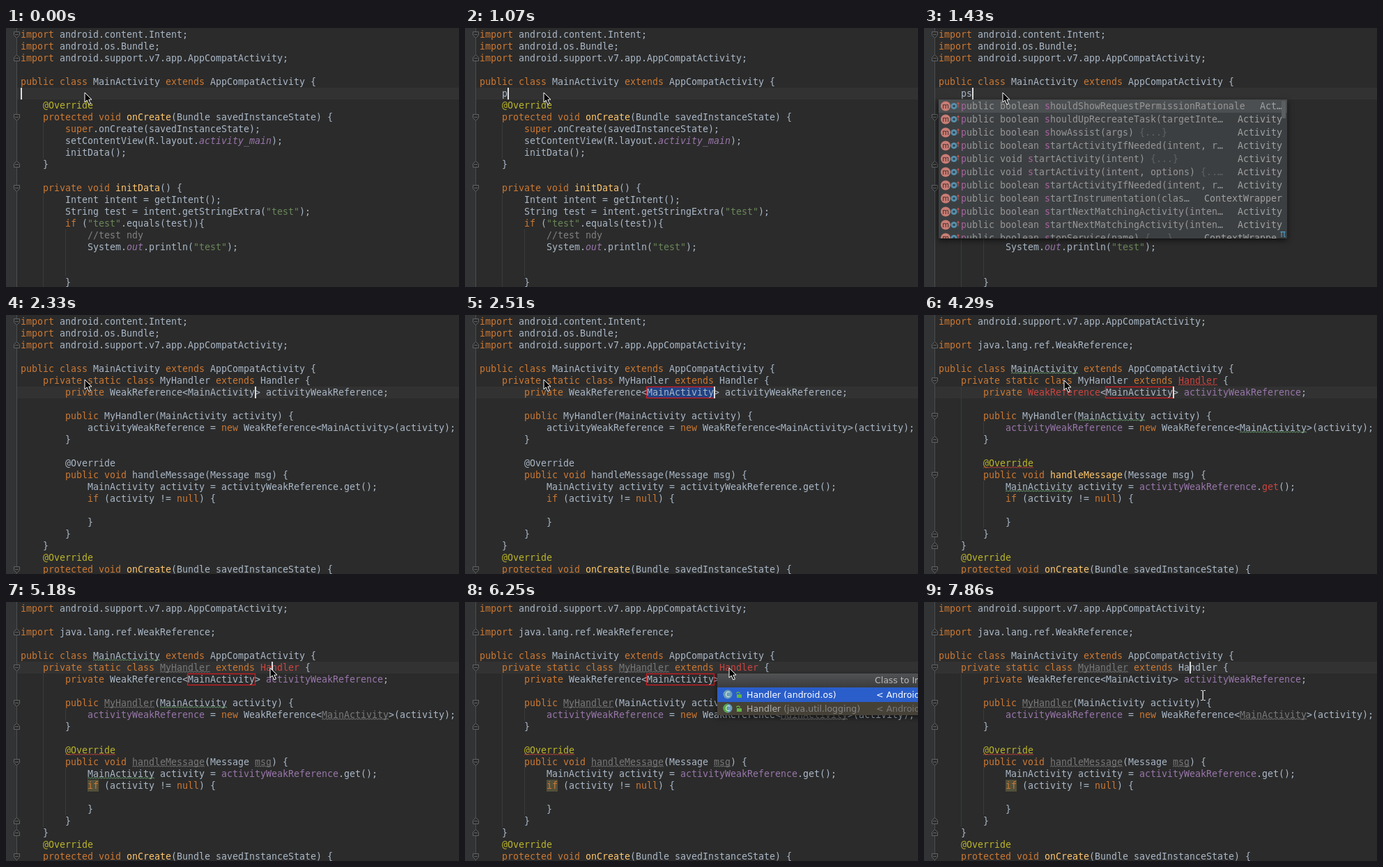
Recreate the animation shown at these times as an HTML page with a canvas. Size 650 by 373 pixels, loop 8000 ms.

```html
<!DOCTYPE html>
<html lang="en">
<head>
<meta charset="utf-8">
<title>Editor</title>
<style>
html, body { margin: 0; width: 100%; height: 100%; overflow: hidden; background: #2b2b2b; }
canvas { display: block; }
</style>
</head>
<body>
<canvas id="stage" width="650" height="373"></canvas>
<script>
(() => {
const ctx = document.getElementById('stage').getContext('2d');
const LOOP = 8000, LEFT = 21, CHAR = 8, LINE = 17;
const MONO = '13.29px "DejaVu Sans Mono", monospace';
const SANS = '12.5px "DejaVu Sans", sans-serif';
const SMALL = '10px "DejaVu Sans", sans-serif';
const C = {
  text: '#a9b7c6', key: '#cc7832', method: '#ffc66d', note: '#bbb529', string: '#6a8759',
  grey: '#808080', field: '#9876aa', error: '#cc4440', wave: '#659c6b', unused: '#787878'
};
const KEYWORDS = new Set('import public class extends protected void super private if new static null'.split(' '));

const oldImports = `import android.content.Intent;
import android.os.Bundle;
import android.support.v7.app.AppCompatActivity;
`.split('\n');
const newImports = [oldImports[2], '', 'import java.lang.ref.WeakReference;', ''];
const classLine = 'public class MainActivity extends AppCompatActivity {';
const plainBody = `    @Override
    protected void onCreate(Bundle savedInstanceState) {
        super.onCreate(savedInstanceState);
        setContentView(R.layout.activity_main);
        initData();
    }

    private void initData() {
        Intent intent = getIntent();
        String test = intent.getStringExtra("test");
        if ("test".equals(test)){
            //test ndy
            System.out.println("test");


        }`.split('\n');
const handlerBody = `    private static class MyHandler extends Handler {
        private WeakReference<MainActivity> activityWeakReference;

        public MyHandler(MainActivity activity) {
            activityWeakReference = new WeakReference<MainActivity>(activity);
        }

        @Override
        public void handleMessage(Message msg) {
            MainActivity activity = activityWeakReference.get();
            if (activity != null) {

            }
        }
    }`.split('\n');

const suggestions = [
  ['boolean shouldShowRequestPermissionRationale', 'Act…'],
  ['boolean shouldUpRecreateTask(targetInte…', 'Activity'],
  ['boolean showAssist(args) {...}', 'Activity'],
  ['boolean startActivityIfNeeded(intent, r…', 'Activity'],
  ['void startActivity(intent) {...}', 'Activity'],
  ['void startActivity(intent, options) {..…', 'Activity'],
  ['boolean startActivityIfNeeded(intent, r…', 'Activity'],
  ['boolean startInstrumentation(clas…', 'ContextWrapper'],
  ['boolean startNextMatchingActivity(inten…', 'Activity'],
  ['boolean startNextMatchingActivity(inten…', 'Activity'],
  ['boolean stopService(name) {...}', 'ContextWrappe…']
];

// Last value whose start time has passed.
const pick = (t, steps) => steps.reduce((now, [start, value]) => t >= start ? value : now, null);
const rowY = row => 1 + row * LINE;
const colX = col => LEFT + col * CHAR;

function rect(x, y, w, h, color) {
  ctx.fillStyle = color;
  ctx.fillRect(x, y, w, h);
}

function label(str, x, y, color, font = MONO, align = 'left') {
  ctx.font = font;
  ctx.textAlign = align;
  ctx.fillStyle = color;
  ctx.fillText(str, x, y);
}

function shape(points, fill, stroke) {
  ctx.beginPath();
  points.forEach(([x, y]) => ctx.lineTo(x, y));
  ctx.closePath();
  if (fill) { ctx.fillStyle = fill; ctx.fill(); }
  if (stroke) { ctx.strokeStyle = stroke; ctx.lineWidth = 1; ctx.stroke(); }
}

function disc(x, y, r, color, from = 0, to = Math.PI * 2) {
  ctx.beginPath();
  ctx.arc(x, y, r, from, to);
  ctx.fillStyle = color;
  ctx.fill();
}

function shadowRect(x, y, w, h, color) {
  ctx.save();
  ctx.shadowColor = 'rgba(0,0,0,.6)';
  ctx.shadowBlur = 8;
  ctx.shadowOffsetY = 3;
  rect(x, y, w, h, color);
  ctx.restore();
}

function wave(x, y, w, color) {
  ctx.beginPath();
  for (let i = 0; i <= w; i += 2) ctx.lineTo(x + i, y + (i % 4 ? -0.7 : 0.7));
  ctx.strokeStyle = color;
  ctx.lineWidth = 1;
  ctx.stroke();
}

const isSlanted = word => word === 'activity_main' || word === 'out';

function tokenColor(word, before) {
  if (word.startsWith('//')) return C.grey;
  if (word[0] === '"') return C.string;
  if (word[0] === '@') return C.note;
  if (KEYWORDS.has(word)) return C.key;
  if (before.endsWith('void ')) return C.method;
  return isSlanted(word) ? C.field : C.text;
}

function codeLine(str, row, marks = {}) {
  for (const m of str.matchAll(/\/\/.*|"[^"]*"|@?\w+|[^\w\s"@]+/g)) {
    const word = m[0], x = colX(m.index), y = rowY(row) + 13;
    const [color, line] = marks[word] || [];
    const font = (isSlanted(word) ? 'italic ' : '') + MONO;
    label(word, x, y, color || tokenColor(word, str.slice(0, m.index)), font);
    if (line) wave(x, y + 1.5, word.length * CHAR, line);
  }
}

// Per row: word -> [text colour, underline colour].
function marksAt(t) {
  if (t < 3050) return { 12: { '@Override': [C.text] }, 13: { handleMessage: [C.text] } };
  const done = t >= 4650;
  const green = t >= 3230 && t < 5540 ? C.wave : null;
  const cls = { MainActivity: [null, green] };
  const field = { activityWeakReference: [C.field] };
  const dead = done ? [C.unused, C.unused] : [];
  const missing = done ? [] : [C.error];
  return {
    4: cls,
    5: { MyHandler: dead, Handler: t >= 7860 ? [] : [C.error, t < 5180 && C.error] },
    6: { ...field, WeakReference: missing },
    8: { ...cls, MyHandler: dead },
    9: { ...field, MainActivity: done ? dead : cls.MainActivity },
    12: { '@Override': [null, '#bc3f3c'] },
    13: { handleMessage: dead, msg: dead },
    14: { ...field, ...cls, get: missing }
  };
}

function fold(row, end) {
  const y = rowY(row) + 8.5, s = end ? -1 : 1;
  const points = [[11, -4], [19, -4], [19, 1], [15, 5], [11, 1]];
  shape(points.map(([x, d]) => [x + 0.5, y + d * s]), '#2b2b2b', '#606366');
  rect(13, y - 0.5, 5, 1, '#606366');
}

function guide(col, from, to) {
  rect(colX(col), rowY(from), 1, (to - from + 1) * LINE, '#393b3c');
}

function caret(col, row) {
  rect(colX(col), rowY(row), 2, LINE, '#dddddd');
}

function suggestion([sign, owner], i, t) {
  const y = 112.5 + i * 19, base = y + 4.5;
  disc(31, y, 7, '#c77d75');
  label('m', 31, y + 3.5, '#3b2b2b', SMALL, 'center');
  disc(43, y, 4.5, '#5590ad');
  disc(43, y, 1.8, '#2f4652');
  shape([[49, y - 6], [51, y - 3], [47, y - 3]], '#c75450');
  rect(48.5, y - 4, 1, 6, '#c75450');

  const full = 'public ' + sign;
  const s = full.indexOf(' s') + 1;
  const hitEnd = s + (t >= 1790 && full[s + 1] === 'h' ? 2 : 1);
  const brace = full.includes('{') ? full.indexOf('{') : full.length;
  const part = (from, to, color) => label(full.slice(from, to), 53 + from * CHAR, base, color);
  part(0, 1, '#a8649f');
  part(1, s, '#969696');
  part(s, hitEnd, '#a8649f');
  part(hitEnd, brace, '#969696');
  part(brace, full.length, '#5f6163');
  label(owner, 514, base, '#a0a0a0', MONO, 'right');
}

function completion(t) {
  shadowRect(21, 103, 500, 200, '#3c3f41');
  ctx.save();
  ctx.beginPath();
  ctx.rect(21, 103, 500, 200);
  ctx.clip();
  rect(21, 103, 500, 19, '#4c4f51');
  suggestions.forEach((item, i) => suggestion(item, i, t));
  rect(513, 105, 6, 25, '#5c5f61');
  label('π', 511, 301, '#4a9cc9');
  ctx.restore();
}

function importHint() {
  shadowRect(213, 56, 305, 24, '#4b4e50');
  ctx.strokeStyle = '#626567';
  ctx.lineWidth = 1;
  ctx.strokeRect(213.5, 56.5, 304, 23);
  label('? android.os.Handler? (multiple choices...) ⌥⏎', 219, 72, '#bbbbbb', '12px "DejaVu Sans", sans-serif');
}

function classIcon(x, y, tint) {
  disc(x, y, 6.5, '#6a9fb8');
  if (tint) disc(x, y, 6.5, tint, Math.PI / 2, Math.PI * 1.5);
  label('C', x, y + 4, '#e8eef0', SMALL, 'center');
  rect(x + 13, y, 7, 5, '#62b543');
  ctx.strokeStyle = '#62b543';
  ctx.lineWidth = 1.3;
  ctx.beginPath();
  ctx.arc(x + 15, y - 1, 2.2, Math.PI, 0);
  ctx.stroke();
}

function classChooser() {
  shadowRect(362, 103, 300, 60, '#464137');
  const bar = ctx.createLinearGradient(0, 103, 0, 123);
  bar.addColorStop(0, '#505254');
  bar.addColorStop(1, '#3a3c3d');
  rect(362, 103, 288, 20, bar);
  label('Class to Import', 588, 117, '#bbbbbb', SANS);
  rect(362, 123, 288, 21, '#2a5ecb');
  classIcon(377, 133);
  label('Handler (android.os)', 404, 138, '#ffffff', SANS);
  label('< Android', 590, 138, '#ffffff', SANS);
  classIcon(377, 153, '#55a84a');
  label('Handler', 404, 158, '#b0b0b0', SANS);
  const w = ctx.measureText('Handler ').width;
  label('(java.util.logging)', 404 + w, 158, '#858585', SANS);
  label('< Android', 590, 158, '#777777', SANS);
}

function pointer(t) {
  const [x, y, kind] = pick(t, [
    [0, [113, 93]], [3940, [125, 94]], [4110, [160, 94]], [4290, [201, 94]], [4470, [211, 94]],
    [4830, [270, 95]], [5000, [340, 95]], [5180, [379, 95]], [6610, [386, 108]],
    [6790, [395, 125]], [6970, [399, 133]], [7330, [400, 133, 'hand']], [7860, [400, 134, 'beam']]
  ]);
  ctx.save();
  ctx.translate(x, y);
  ctx.lineJoin = 'round';
  if (kind === 'beam') {
    rect(-0.5, -6, 1.5, 13, '#d8d8d8');
    for (const end of [-7, 7]) {
      rect(-3, end, 3, 1, '#d8d8d8');
      rect(1, end, 3, 1, '#d8d8d8');
    }
  } else if (kind === 'hand') {
    shape([[-1, 0], [1, 0], [2, 6], [8, 8], [10, 10], [8, 18], [-1, 18], [-5, 11], [-4, 9], [-1, 11]], '#ffffff', '#000000');
  } else {
    shape([[0, 0], [0, 14], [3.2, 11], [5.8, 17], [8.4, 16], [5.8, 10.2], [10, 10]], '#000000', '#ffffff');
  }
  ctx.restore();
}

function draw(t) {
  const expanded = t >= 2330, analysed = t >= 3050, imported = t >= 3400;
  const typed = pick(t, [[0, ''], [1070, 'p'], [1250, 'ps'], [1790, 'psh']]);
  const row = expanded && t < 5180 ? 6 : 5;

  rect(0, 0, 650, 373, '#2b2b2b');
  rect(0, 0, 15, 373, '#313335');
  rect(16, rowY(row), 634, LINE, '#323232');
  rect(15, 0, 1, 373, '#4b4d4f');

  if (!expanded) {
    guide(4, 8, 10);
    guide(4, 14, 21);
    guide(8, 17, 20);
  } else if (analysed) {
    guide(4, 6, 18);
    guide(8, 9, 9);
    guide(8, 14, 17);
  }

  const starts = analysed ? [5, 8, 13, 21] : expanded ? [21] : [7, 13];
  const ends = analysed ? [2, 10, 18, 19] : expanded ? [2] : [2, 11];
  if (!imported) starts.push(0);
  starts.forEach(r => fold(r));
  ends.forEach(r => fold(r, true));

  if (t >= 2510 && t < 7860) {
    if (t < 3760) rect(colX(30), rowY(6), 96, LINE, '#214283');
    ctx.strokeStyle = '#d01c22';
    ctx.lineWidth = 1.3;
    ctx.strokeRect(260.5, 103.5, 97, 16);
  }
  if (t >= 4650) rect(colX(12), rowY(15), 16, LINE, '#52503a');

  const body = expanded ? [...handlerBody, ...plainBody] : ['    ' + typed, ...plainBody];
  const lines = [...(imported ? newImports : oldImports), classLine, ...body].slice(0, 22);
  const marks = expanded ? marksAt(t) : {};
  lines.forEach((str, i) => codeLine(str, i, marks[i]));

  if (!expanded) caret(t < 180 ? 0 : 4 + typed.length, 5);
  else if (t < 5180) caret(42, 6);
  else if (t < 5890 || t >= 7860) caret(45, 5);

  if (t >= 1430 && !expanded) completion(t);
  if ((t >= 4830 && t < 5180) || (t >= 5720 && t < 6250)) importHint();
  if (t >= 6250 && t < 7860) classChooser();
  pointer(t);
}

const begin = performance.now();
function tick() {
  draw((performance.now() - begin) % LOOP);
  requestAnimationFrame(tick);
}
tick();
})();
</script>
</body>
</html>
```
